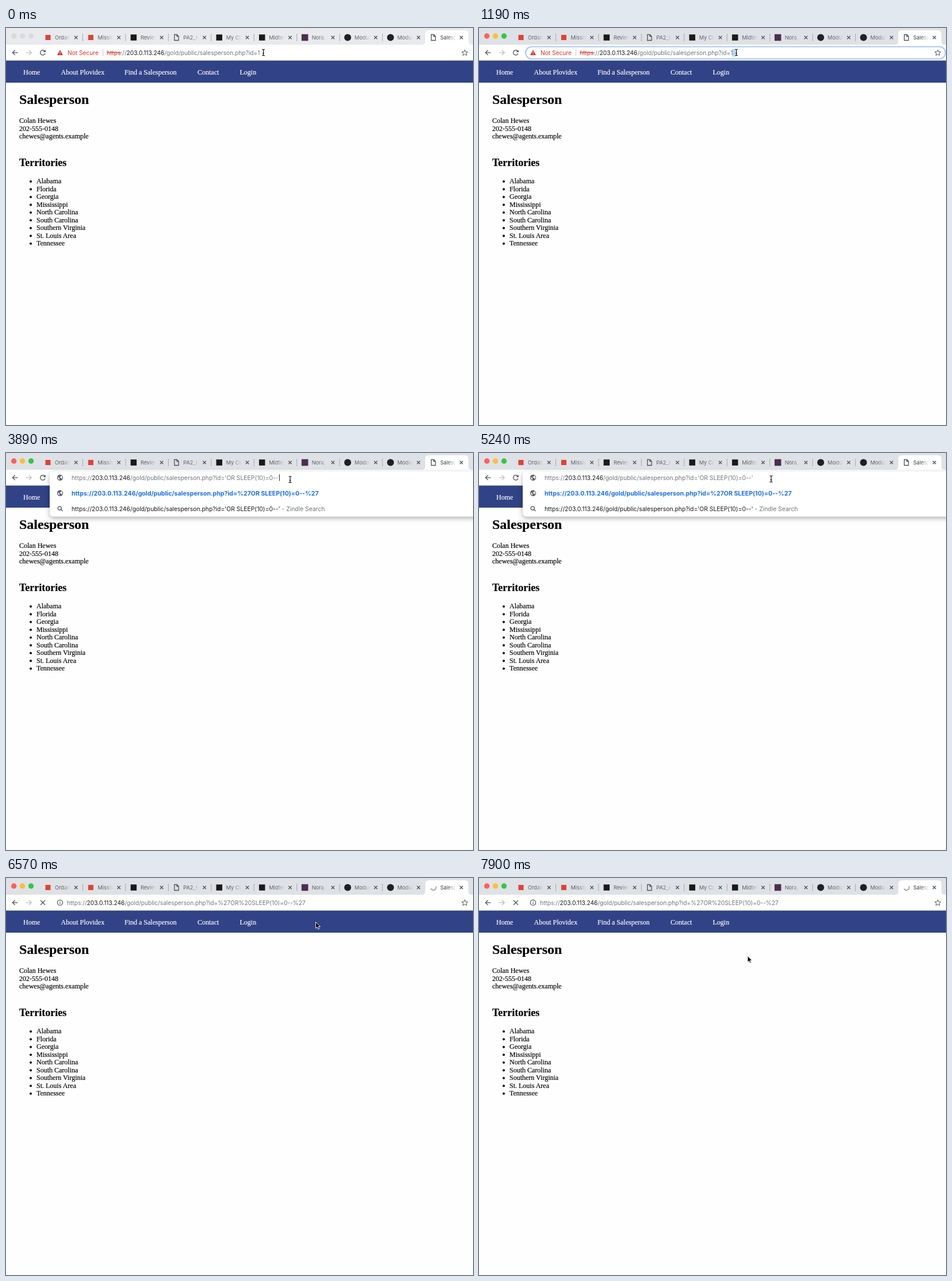
These frames come from a looping animation (812 by 690 pixels, 8 s). An HTML page:

```html
<!DOCTYPE html>
<html lang="en">
<head>
<meta charset="utf-8">
<title>Salesperson</title>
<style>
  html, body { margin: 0; width: 100%; height: 100%; overflow: hidden; background: #fefefe; }
  svg { display: block; width: 100vw; height: 100vh; }
  text { white-space: pre; }
  .ui { font: 10.2px Inter, sans-serif; font-feature-settings: "calt" 0; fill: #17181a; }
  .page { font: 12px "Liberation Serif", serif; fill: #000; }
  .page text { stroke: #000; stroke-width: .18; }
  .page .nav { fill: #fff; stroke: #fff; }
  .suggest { font-size: 10.35px; }
  .match { font-size: 10.6px; font-weight: 700; fill: #1a6fe8; }
  .tab { font-size: 9.2px; fill: #5f6368; }
  .dim { fill: #707478; }
  .red { fill: #d93025; }
  .line { fill: none; stroke: #505458; stroke-width: 1.3; }
</style>
</head>
<body>
<svg id="stage" viewBox="0 0 812 690">
  <defs>
    <linearGradient id="fadeRamp">
      <stop offset=".5" stop-color="#fff"/><stop offset="1" stop-color="#fff" stop-opacity="0"/>
    </linearGradient>
    <mask id="fade" maskUnits="userSpaceOnUse" x="12" y="0" width="27" height="30">
      <rect x="12" width="27" height="30" fill="url(#fadeRamp)"/>
    </mask>
    <path id="doc" class="line" d="M-3.5-5H1L3.800-2V5H-3.500ZM.8-5V-1.800H3.800"/>
    <g id="globe">
      <circle r="5.200" fill="#5f6368"/>
      <path d="M-4-1.500L-1 1.200V4Q-4 2.500-4-1.500M-1-4L2.200-4L1.500-1.800L-1-1L.8.5L2.500 1L3 2.800Q4.800 0 3.600-2.400L2.200-4Z" fill="#fff"/>
    </g>
    <path id="beamShape" d="M-2.500-5.500Q0-5.500 0-4Q0-5.500 2.500-5.500M0-4.500V4.500M-2.500 5.500Q0 5.500 0 4Q0 5.500 2.500 5.500M-1.300 1.500H1.300"/>
  </defs>

  <g id="page" class="page"></g>

  <g class="ui">
    <rect id="strip" width="812" height="29"/>
    <rect y="29" width="812" height="27" fill="#fff"/>
    <rect y="56" width="812" height="1" fill="#a9adb8"/>
    <path d="M723 29Q729 29 729 23V10Q729 4 735 4H798Q804 4 804 10V23Q804 29 810 29Z" fill="#fff"/>
    <g id="lights"></g>
    <g id="tabs"></g>

    <path class="line" d="M20.500 42.800H11.500M15.700 38.500L11.300 42.800L15.700 47.100"/>
    <path class="line" style="stroke:#bbbec1" d="M35 42.800H44M39.800 38.500L44.200 42.800L39.800 47.100"/>
    <g id="reload">
      <path class="line" d="M67.200 40A4.300 4.300 0 1 0 68 44.200"/>
      <path d="M68.800 37.800V42H64.600Z" fill="#505458"/>
    </g>
    <path id="stop" class="line" d="M60 38.800L68 46.800M68 38.800L60 46.800"/>
    <rect id="ring" x="81" y="32.500" width="730" height="21" rx="10.500" fill="#fff" stroke="#a9c8f8" stroke-width="2"/>
    <path class="line" style="stroke-width:1" d="M797.700 37.800L799.200 41.300L802.900 41.600L800.100 44L801 47.700L797.700 45.700L794.400 47.700L795.300 44L792.500 41.600L796.200 41.300Z"/>
    <path id="spinner" fill="none" stroke="#868a8f" stroke-width="1.500"/>

    <g id="insecure">
      <rect id="selection" y="36.500" height="13" fill="#b5d6fc"/>
      <path d="M94 38L99 47.200H89Z" class="red"/>
      <path d="M94 41V44M94 45V46.200" stroke="#fff"/>
      <text x="107" y="46.500" class="red">Not Secure</text>
      <path d="M168.500 37V49" stroke="#c3c6c9"/>
      <path d="M175 43H200.500" stroke="#d93025" stroke-width=".9"/>
    </g>

    <g id="dropdown" class="suggest">
      <rect x="76" y="32" width="760" height="78.500" rx="6" fill="#fff" style="filter:drop-shadow(0 3px 4px rgba(0,0,0,.3))"/>
      <use href="#globe" x="94" y="42.800"/>
      <use href="#globe" x="94" y="69.800"/>
      <path class="line" d="M96 98.500L98.500 101M96.300 96A3.100 3.100 0 1 1 90.100 96A3.100 3.100 0 1 1 96.300 96"/>
      <path id="caret" d="M475.500 37V48.500" stroke="#111" stroke-width=".9"/>
    </g>

    <g id="loading">
      <circle cx="94" cy="42.800" r="4.700" class="line" style="stroke-width:1.100"/>
      <path d="M94 42.300V45.500M94 40V41.200" stroke="#505458" stroke-width="1.100"/>
    </g>
  </g>

  <g id="cursor">
    <g id="beam" fill="none">
      <use href="#beamShape" stroke="#fff" stroke-width="2.200" stroke-opacity=".7"/>
      <use href="#beamShape" stroke="#000" stroke-width="1.100"/>
    </g>
    <path id="arrow" d="M0 0V11L2.500 8.700L4.200 12.600L6.100 11.800L4.400 8H7.900Z" fill="#000" stroke="#fff" stroke-width=".9"/>
  </g>
</svg>
<script>
const $ = id => document.getElementById(id);
const add = (id, markup) => $(id).insertAdjacentHTML('beforeend', markup);
const show = (id, visible) => { $(id).style.display = visible ? '' : 'none'; };
const label = (x, y, text, attrs = '') => `<text x="${x}" y="${y}" ${attrs}>${text}</text>`;

// Page content
const navLinks = [[30, 'Home'], [95.5, 'About Plovidex'], [206, 'Find a Salesperson'], [333, 'Contact'], [406.5, 'Login']];
const contact = ['Colan Hewes', '202-555-0148', 'chewes@agents.example'];
const territories = ['Alabama', 'Florida', 'Georgia', 'Mississippi', 'North Carolina', 'South Carolina',
  'Southern Virginia', 'St. Louis Area', 'Tennessee'];
const LINE = 13.5;

add('page', '<rect y="57" width="812" height="38" fill="#314286"/>'
  + navLinks.map(([x, text]) => label(x, 80.5, text, 'class="nav"')).join('')
  + label(23, 132, 'Salesperson', 'font-size="24" font-weight="bold"')
  + contact.map((text, i) => label(23, 165 + i * LINE, text)).join('')
  + label(23, 240, 'Territories', 'font-size="18" font-weight="bold"')
  + territories.map((text, i) => {
      const y = 270.3 + i * LINE;
      return `<circle cx="43" cy="${y - 3.5}" r="2"/>` + label(53, y, text);
    }).join(''));

// Tab strip
const square = (color, s) => `<rect x="${-s / 2}" y="${-s / 2}" width="${s}" height="${s}" fill="${color}"/>`;
const mail = square('#dc4437', 9), board = square('#1c1a17', 10.5), chat = square('#4b2f4e', 11.5);
const disc = '<circle r="6" fill="#1d2024"/>', file = '<use href="#doc"/>';
const tabs = [[mail, 'Ordan'], [mail, 'Missis'], [board, 'Review'], [file, 'PA2_H'], [board, 'My Cla'],
  [board, 'Midter'], [chat, 'Nora, J'], [disc, 'Modul'], [disc, 'Modul'], [file, 'Salesp']];

add('tabs', tabs.map(([icon, title], i) => {
  const active = i === tabs.length - 1;
  return `<g transform="translate(${73 + i * 74.44})">
    <g transform="translate(0 16.5)" ${active ? 'id="tabIcon"' : ''}>${icon}</g>
    ${label(12, 20, title, `class="tab" mask="url(#fade)" ${active ? 'style="fill:#3c4043"' : ''}`)}
    <path class="line" d="M46 13.7L51.5 19.2M51.5 13.7L46 19.2"/>
    ${i < 8 ? '<path d="M60.5 10V23" stroke="#a5a9ae"/>' : ''}</g>`;
}).join(''));

const lightColors = ['#fc5f5a', '#fdbd3e', '#33c748'];
add('lights', lightColors.map((c, i) => `<circle cx="${13.7 + i * 14.9}" cy="14" r="4.7"/>`).join(''));

// Address bar text
const HOST = '203.0.113.246', PATH = '/gold/public/salesperson.php?id=';
const address = (x, scheme, query) => label(x, 46.5,
  `${scheme}<tspan class="dim">://</tspan>${HOST}<tspan class="dim">${PATH}${query}</tspan>`);
const plain = '<tspan class="dim">https</tspan>';
const typed = "'OR SLEEP(10)=0--'";

add('insecure', address(175, '<tspan class="red">https</tspan>', '1'));
add('dropdown', address(114, plain, typed)
  + label(114, 73.5, `https://${HOST}${PATH}%27OR SLEEP(10)=0--%27`, 'class="match"')
  + label(114, 100.5, `https://${HOST}${PATH}${typed}<tspan class="dim"> - Zindle Search</tspan>`));
add('loading', address(106, plain, '%27OR%20SLEEP(10)=0--%27'));

// Timeline
const LOOP = 8000, STEP = 148;
const FOCUS = 150, SELECT_ALL = 300, DESELECT = 740, SELECT_ID = 1190, TYPED = 2840, LOAD = 5530;
const caretToggles = [2840, 3440, 3890, 4340, 4640, 5240];
const jumps = [[0, 447.5, 42.5], [3290, 462, 55], [3440, 482, 59], [3590, 493, 50], [3890, 494, 46],
  [4190, 504, 45], [4340, 508, 45]];
const glide = [[LOAD, 508, 45], [5960, 509, 47], [6270, 526, 64], [6560, 538.7, 76], [7000, 526, 112],
  [7300, 498, 145], [7600, 472, 139], [7890, 467, 135.5]];

function pointer(t) {
  if (t < LOAD) return jumps.filter(j => j[0] <= t).pop().slice(1);
  const next = glide.findIndex(k => k[0] > t);
  if (next < 0) return glide[glide.length - 1].slice(1);
  const [a, b] = [glide[next - 1], glide[next]];
  const u = (t - a[0]) / (b[0] - a[0]);
  return [1, 2].map(i => a[i] + (b[i] - a[i]) * u);
}

// Counter-clockwise arc growing from twelve o'clock to half a turn
function spinnerPath(t) {
  const head = 90 + 360 * t / 1320;
  const tail = Math.max(90, head - 179.9);
  const at = deg => {
    const a = deg * Math.PI / 180;
    return `${743.2 + 4.7 * Math.cos(a)} ${16.5 - 4.7 * Math.sin(a)}`;
  };
  return `M${at(tail)}A4.7 4.7 0 0 0 ${at(head)}`;
}

function draw(time) {
  const t = time < LOAD ? time : LOAD + Math.floor((time - LOAD) / STEP) * STEP;
  const focused = t >= FOCUS, loading = t >= LOAD;

  $('strip').setAttribute('fill', focused ? '#dee1e6' : '#e8eaed');
  [...$('lights').children].forEach((c, i) => c.setAttribute('fill', focused ? lightColors[i] : '#d9dbde'));

  show('ring', focused && t < TYPED);
  show('insecure', t < TYPED);
  show('dropdown', t >= TYPED && !loading);
  show('loading', loading);
  show('reload', !loading);
  show('stop', loading);
  show('tabIcon', !loading);
  show('spinner', loading);
  if (loading) $('spinner').setAttribute('d', spinnerPath(t - LOAD + 40));

  const all = t >= SELECT_ALL && t < DESELECT;
  show('selection', all || t >= SELECT_ID);
  $('selection').setAttribute('x', all ? 175 : 440);
  $('selection').setAttribute('width', all ? 271 : 6);
  show('caret', caretToggles.filter(c => c <= t).length % 2 === 1);

  const [x, y] = pointer(t);
  const overPage = loading && y > 57;
  $('cursor').setAttribute('transform', `translate(${x} ${y})`);
  show('beam', !overPage);
  show('arrow', overPage);
}

const start = performance.now();
function tick() {
  draw((performance.now() - start) % LOOP);
  requestAnimationFrame(tick);
}
tick();
</script>
</body>
</html>
```
